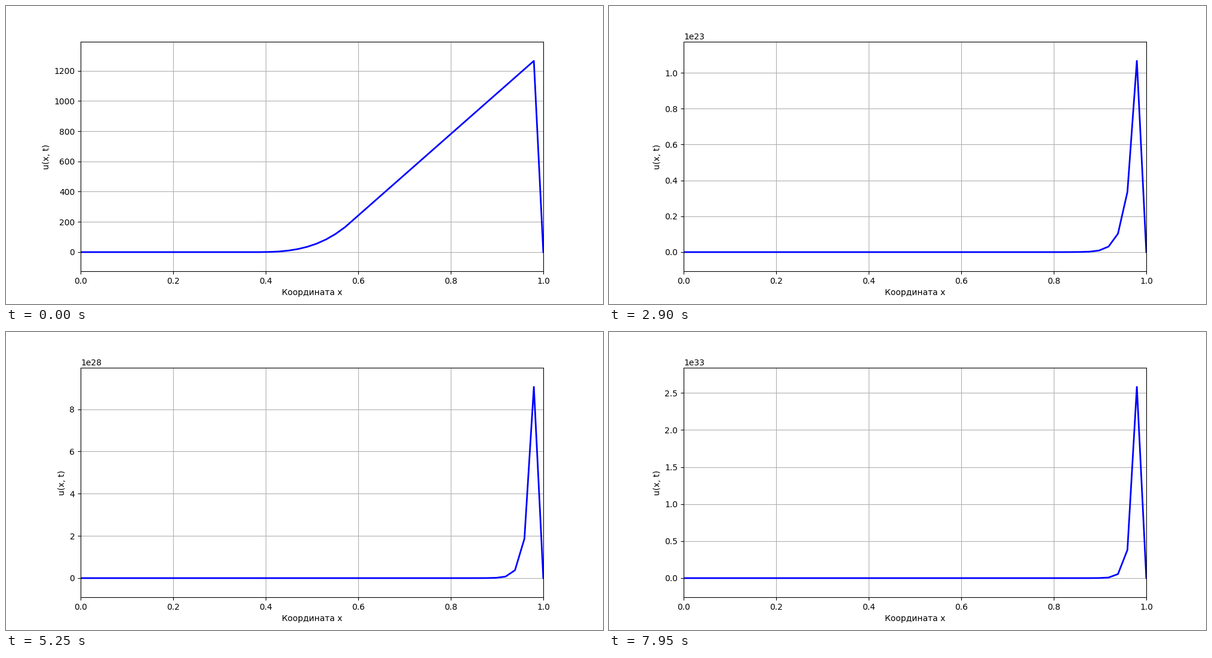
Write a matplotlib script that moves like this. It is 1000 by 500 pixels and loops after 8000 ms.

```python
import numpy as np
import matplotlib.pyplot as plt
from matplotlib.animation import FuncAnimation

FRAMES = 160
INTERVAL = 50
NODES = 50

x = np.linspace(0, 1, NODES)


def solve(steps):
    """Each step adds the already updated left neighbour: a running sum."""
    u = np.zeros(NODES)
    u[20:30] = np.arange(1, 11)
    u = np.cumsum(u)
    states = []
    for _ in range(steps):
        u = np.cumsum(u)
        u[-1] = 0
        states.append(u)
    return states


states = solve(FRAMES)

fig, ax = plt.subplots(figsize=(10, 5), dpi=100)
line, = ax.plot(x, states[0], color="blue", lw=2)
ax.set_xlim(0, 1)
ax.set_xlabel("Координата x")
ax.set_ylabel("u(x, t)")
ax.grid(True)


def update(k):
    u = states[k]
    margin = 0.1 * u.max()
    line.set_ydata(u)
    ax.set_ylim(-margin, u.max() + margin)
    return line,


anim = FuncAnimation(fig, update, frames=FRAMES, interval=INTERVAL,
                     repeat=True, repeat_delay=0, blit=False)
plt.show()
```
